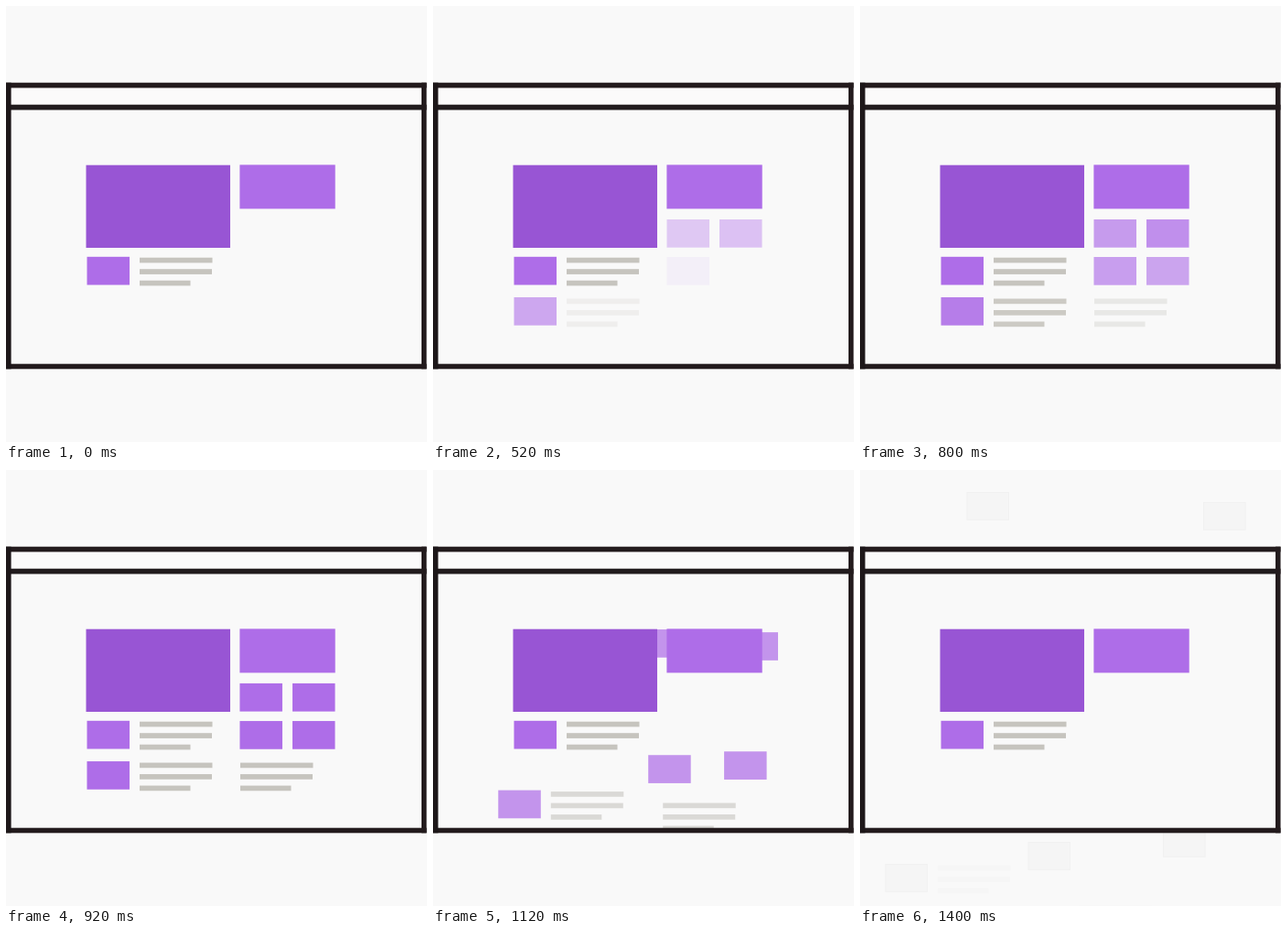
Animation of 460x476 px, one loop 3000 ms. Source, as an HTML page with a canvas:

```html
<!DOCTYPE html>
<html lang="en">
<head>
<meta charset="utf-8">
<title>Page layout</title>
<style>
  html, body { margin: 0; width: 100%; height: 100%; overflow: hidden; background: #f9f9f9; }
  canvas { display: block; width: 460px; height: 476px; }
</style>
</head>
<body>
<canvas id="stage" width="460" height="476"></canvas>
<script>
const ctx = document.getElementById('stage').getContext('2d');
const LOOP = 3000, STEP = 40, FADE_START = 280, FLY_END = 1400;
const BG = '#f9f9f9', DEEP = '#9855d4', LILAC = '#ae6de8', GREY = '#c6c4be', INK = '#231b1d';

// Home position, flight offset and opacity at each fade time.
const fadeTimes = [280, 520, 800, 920];
const parts = [
  { kind: 'tile', x: 88.5, y: 318, dx: -61, dy: 112, fade: [.1, .58, .88, 1] },
  { kind: 'text', x: 146, y: 319.5, dx: -61, dy: 112, fade: [.02, .22, .88, 1] },
  { kind: 'tile', x: 255.5, y: 233, dx: -139, dy: -209, fade: [0, .35, .67, 1] },
  { kind: 'tile', x: 313, y: 233, dx: 62, dy: -198, fade: [.03, .4, .75, 1] },
  { kind: 'tile', x: 255.5, y: 274, dx: -72, dy: 132, fade: [0, .07, .65, 1] },
  { kind: 'tile', x: 313, y: 274, dx: 18, dy: 118, fade: [0, 0, .6, 1] },
  { kind: 'text', x: 256, y: 319.5, dx: -17, dy: 156, fade: [0, 0, .33, 1] }
];

function rect(x, y, w, h, color) {
  ctx.fillStyle = color;
  ctx.fillRect(x, y, w, h);
}

function tile(x, y, color) {
  rect(x, y, 46.5, 30.7, color);
}

function text(x, y, color) {
  [79.5, 79, 55.5].forEach((w, i) => rect(x, y + i * 12.5, w, 5.7, color));
}

const draw = { tile, text };

function fadeIn(levels, t) {
  if (t < FADE_START) return 0;
  for (let i = 1; i < levels.length; i++) {
    if (t < fadeTimes[i]) {
      const k = (t - fadeTimes[i - 1]) / (fadeTimes[i] - fadeTimes[i - 1]);
      return levels[i - 1] + (levels[i] - levels[i - 1]) * k;
    }
  }
  return 1;
}

// Speeds up over a short ramp, then keeps a constant speed.
function flight(t) {
  const start = 912, ramp = 196, speed = 1 / (FLY_END - start - ramp / 2);
  const s = Math.min(t, FLY_END) - start;
  if (s <= 0) return 0;
  return speed * (s < ramp ? s * s / (2 * ramp) : s - ramp / 2);
}

function drawPart(p, t) {
  const f = flight(t), x = p.x + p.dx * f, y = p.y + p.dy * f;
  if (t >= FLY_END) {
    // Faint traces remain where the parts came to rest.
    if (p.kind === 'text') return text(x, y, '#f6f6f6');
    tile(x, y, '#f5f5f5');
    ctx.strokeStyle = '#f1f1f1';
    ctx.lineWidth = 1;
    ctx.strokeRect(x + .5, y + .5, 45.5, 29.7);
    return;
  }
  const out = Math.pow(Math.max(0, 1 - f), p.kind === 'text' ? 1.6 : 1);
  ctx.globalAlpha = fadeIn(p.fade, t) * out;
  draw[p.kind](x, y, p.kind === 'text' ? GREY : LILAC);
  ctx.globalAlpha = 1;
}

function drawPage() {
  rect(87.5, 173.7, 157.5, 90.3, DEEP);
  rect(255.4, 173.4, 104.3, 48, LILAC);
  tile(88.5, 273.8, LILAC);
  text(146, 274.7, GREY);
}

function drawWindow() {
  rect(0, 83.7, 459.5, 5.7, INK);
  rect(0, 107.7, 459.5, 5.8, '#211b1d');
  rect(0, 390.7, 459.5, 5.6, INK);
  rect(0, 83.7, 5.6, 312.6, '#1d1719');
  rect(454, 83.7, 5.5, 312.6, INK);
}

function render(t) {
  rect(0, 0, 460, 476, BG);
  rect(5, 89, 449, 19, '#fbfafa');
  parts.forEach(p => drawPart(p, t));
  drawPage();
  drawWindow();
}

const began = performance.now();
function tick() {
  const t = (performance.now() - began) % LOOP;
  render(Math.floor(t / STEP) * STEP);
  requestAnimationFrame(tick);
}
tick();
</script>
</body>
</html>
```
